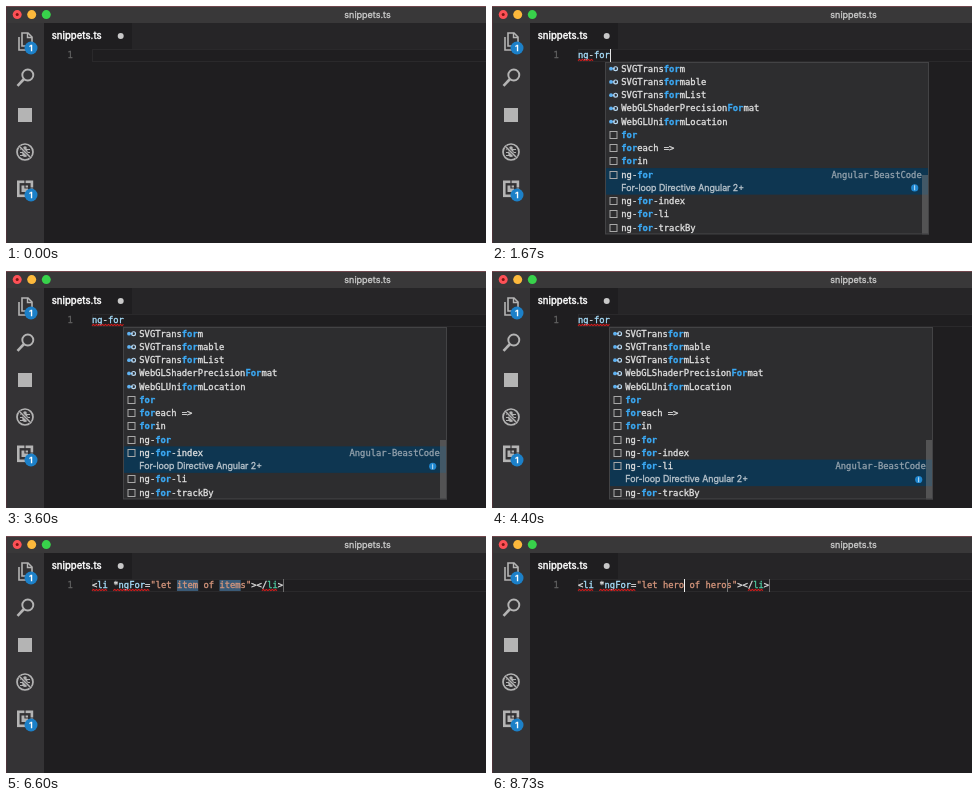
These frames come from a looping animation (480x237 px, 8.79 s). An HTML page with a canvas:

```html
<!DOCTYPE html>
<html lang="en">
<head>
<meta charset="utf-8">
<title>Snippet completion</title>
<style>
  html, body { margin: 0; width: 100%; height: 100%; overflow: hidden; background: #1f1e20; }
  canvas { display: block; }
</style>
</head>
<body>
<canvas id="stage" width="480" height="237"></canvas>
<script>
const c = document.getElementById('stage').getContext('2d');
const LOOP = 8790, LEFT = 86, CHAR = 5.31, ROW = 13.26, POPUP_TOP = 56, POPUP_WIDTH = 324;
const MONO = '8.82px "DejaVu Sans Mono", monospace';
const UI = 'Inter, sans-serif';
const BACK = '#1f1e20', BAR = '#343335', ICON = '#b4b4b4';
const PLAIN = '#e2e2e2', NAME = '#a8dffc', STRING = '#d6967c', TYPE = '#4ec9a0';

// Time and word of each key press
const typed = [[0, ''], [140, 'n'], [330, 'ng'], [670, 'ng-'], [1130, 'ng-f'], [1400, 'ng-fo'], [1640, 'ng-for']];
const renamed = [[4870, 'item'], [6870, 'h'], [7130, 'he'], [7400, 'her'], [7630, 'hero']];
const EXPAND = 4870, RENAME = 6870, CHECKED = 5870;

const ngList = ['ng-class', 'ng-for', 'ng-for-index', 'ng-for-li', 'ng-for-trackBy', 'ng-if',
  'ng-if-else', 'ng-model', 'ng-style', 'ng-submit', 'ng-switch'];
const forList = ['SVGTransform', 'SVGTransformable', 'SVGTransformList', 'WebGLShaderPrecisionFormat',
  'WebGLUniformLocation', 'for', 'foreach =>', 'forin', 'ng-for', 'ng-for-index', 'ng-for-li', 'ng-for-trackBy'];
const hList = ['ApplicationCache', 'Cache', 'CacheStorage', 'Headers', 'HashChangeEvent', 'MimeTypeArray',
  'SVGPathElement', 'SVGPathSeg', 'SharedWorker', 'WheelEvent'];

// from, to, left edge, query, list, selected row, scrollbar top
const popups = [
  [210, 400, 91, 'n', ngList, 0, 56],
  [400, 670, 97, 'ng', ngList, 0, 56],
  [1200, 1400, 107, 'f', forList, 8, 169],
  [1470, 1640, 113, 'fo', forList, 8, 169],
  [1640, 1930, 113, 'for', forList, 8, 169],
  [1930, 2770, 117, 'for', forList, 8, 169],
  [2770, 3930, 117, 'for', forList, 9, 169],
  [3930, EXPAND, 117, 'for', forList, 10, 169],
  [6930, 7400, 176, 'h', hList, 0, 56]
];

const colX = col => LEFT + col * CHAR;
const latest = (steps, t) => steps.filter(s => s[0] <= t).pop();

function box(x, y, w, h, color) {
  c.fillStyle = color;
  c.fillRect(x, y, w, h);
}
function dot(x, y, r, color) {
  c.fillStyle = color;
  c.beginPath();
  c.arc(x, y, r, 0, 7);
  c.fill();
}
function ring(x, y, r, color, width) {
  c.strokeStyle = color;
  c.lineWidth = width;
  c.beginPath();
  c.arc(x, y, r, 0, 7);
  c.stroke();
}
function line(color, width, ...pts) {
  c.strokeStyle = color;
  c.lineWidth = width;
  c.beginPath();
  for (let i = 0; i < pts.length; i += 2) c.lineTo(pts[i], pts[i + 1]);
  c.stroke();
}
function frame(x, y, w, h, color, width = 1) {
  c.strokeStyle = color;
  c.lineWidth = width;
  c.strokeRect(x, y, w, h);
}
// A hairline outline gives the glyphs a slightly heavier weight
function text(s, x, y, color, font = MONO, align = 'left') {
  c.font = font;
  c.fillStyle = c.strokeStyle = color;
  c.lineWidth = .3;
  c.textAlign = align;
  c.fillText(s, x, y);
  c.strokeText(s, x, y);
}
function code(parts) {
  let col = 0;
  for (const [s, color] of parts) {
    text(s, colX(col), 52, color);
    col += s.length;
  }
}
function squiggle(from, to) {
  const pts = [], end = colX(to);
  for (let x = colX(from), i = 0; x <= end; x += 1.5, i++) pts.push(x, 54.6 - i % 2 * 1.2);
  line('#d81c1c', 1.2, ...pts);
}
function caret(col, color) {
  box(Math.round(colX(col)), 43, 1, 13, color);
}

function badge(y) {
  dot(25, y, 6.5, '#1c80c8');
  text('1', 25, y + 3, '#fff', '600 8px ' + UI, 'center');
}
function activityBar() {
  box(1, 17, 37, 220, BAR);
  // files
  line(ICON, 1.6, 16, 40, 16, 27, 22, 27, 26, 31, 26, 40, 15.2, 40);
  line(ICON, 1.4, 21.5, 27, 21.5, 31.5, 26, 31.5);
  line(ICON, 1.6, 13, 31, 13, 44, 22, 44);
  badge(42);
  // search
  ring(21.8, 69, 5.5, ICON, 1.9);
  line(ICON, 2.6, 18, 73, 11.5, 79.8);
  // source control
  box(12, 102, 14, 14, ICON);
  // debug
  ring(19, 146, 8, ICON, 1.7);
  c.fillStyle = ICON;
  c.beginPath();
  c.ellipse(19, 147, 2.8, 4, 0, 0, 7);
  c.fill();
  for (const y of [143.5, 146.5, 149.5]) line(ICON, 1, 14, y, 24, y);
  dot(19, 142, 1.8, ICON);
  line(BAR, 2.6, 13.5, 140.5, 24.5, 151.5);
  line(ICON, 1.5, 13.2, 140.2, 24.8, 151.8);
  // extensions
  frame(12.3, 175.8, 13.6, 14, ICON, 2.6);
  box(15.5, 179.5, 6.5, 6.5, ICON);
  line(BAR, 1.2, 19, 174, 19, 182, 28, 182);
  badge(189);
}
function shell() {
  box(0, 0, 480, 237, BACK);
  box(0, 0, 480, 17, '#393839');
  box(0, 0, 480, 1, '#70464c');
  box(0, 1, 1, 236, '#4c3339');
  [['#fd5056', 11.2], ['#fdb93c', 25.7], ['#38d24b', 40.3]].forEach(([color, x]) => dot(x, 8.6, 4.5, color));
  dot(11.2, 8.6, 1.5, '#7a1512');
  text('snippets.ts', 361.5, 12, '#cacaca', '9px ' + UI, 'center');
  activityBar();
  box(38, 17, 442, 26, '#262527');
  box(38, 17, 88, 26, BACK);
  text('snippets.ts', 45.7, 33, '#fff', '500 9.5px ' + UI);
  dot(114.7, 30, 3, '#c8c8c8');
  frame(86.5, 43.5, 400, 12, '#2a292b');
  text('1', 61.5, 52, '#606060');
}

function itemIcon(x, y, isSnippet) {
  if (isSnippet) return frame(x + 5, Math.round(y) - 3.5, 7, 7, '#a8a8a8');
  line('#75beff', 1, x + 6, y, x + 10, y);
  dot(x + 6, y, 1.9, '#5fb2f2');
  ring(x + 10.6, y, 1.9, '#b9d9f2', 1.2);
}
function label(name, query, x, y) {
  const at = name.toLowerCase().indexOf(query), end = at + query.length;
  if (at < 0) return text(name, x, y, PLAIN);
  text(name.slice(0, at), x, y, PLAIN);
  text(name.slice(at, end), x + at * CHAR, y, '#3ba9f4', 'bold ' + MONO);
  text(name.slice(end), x + end * CHAR, y, PLAIN);
}
function popup([, , x, query, list, selected, barTop]) {
  const isSnippet = name => /^[a-z]/.test(name);
  const detail = isSnippet(list[selected]);
  const height = ROW * (list.length + detail);
  box(x, POPUP_TOP, POPUP_WIDTH, height, '#2d2d2f');
  let y = POPUP_TOP;
  list.forEach((name, i) => {
    const mid = y + ROW / 2, active = i === selected;
    if (active) box(x, y, POPUP_WIDTH, ROW * (1 + detail), '#0e3651');
    itemIcon(x, mid, isSnippet(name));
    label(name, query, x + 16.3, mid + 3);
    y += ROW;
    if (active && detail) {
      text('Angular-BeastCode', x + 316.7, mid + 3, '#93a1ac', MONO, 'right');
      text('For-loop Directive Angular 2+', x + 16.3, mid + ROW + 3, '#b9c4cc', '8.8px ' + UI);
      dot(x + 309.7, mid + ROW, 3.6, '#1f87d0');
      text('i', x + 309.7, mid + ROW + 2.4, '#d5ebfa', '6px ' + UI, 'center');
      y += ROW;
    }
  });
  box(x + 317, barTop, 7, Math.min(60, POPUP_TOP + height - barTop), 'rgba(130,130,130,.45)');
  frame(x + .5, POPUP_TOP + .5, POPUP_WIDTH - 1, height - 1, '#434345');
}

function typing(t, lit) {
  const word = latest(typed, t)[1];
  code([[word.slice(0, 2), NAME], [word.slice(2, 3), PLAIN], [word.slice(3), NAME]]);
  const wrong = t < 500 ? 0 : t < 1200 ? 2 : t < 2000 ? 3 : 6;
  if (wrong) squiggle(0, wrong);
  if (lit && word) caret(word.length, '#e4e4e4');
}
function expanded(t, lit) {
  const word = latest(renamed, t)[1], n = word.length;
  const first = 16, second = first + n + 4, close = second + n + 3;
  if (t < RENAME) {
    for (const col of [first, second]) box(colX(col), 44, 4 * CHAR, 11, '#3a5a76');
  }
  code([['<', PLAIN], ['li', NAME], [' *', PLAIN], ['ngFor', NAME], ['=', PLAIN],
    [`"let ${word} of ${word}s"`, STRING], ['></', PLAIN], ['li', TYPE], ['>', PLAIN]]);
  if (t >= CHECKED) {
    squiggle(0, 3);
    squiggle(4, 11);
    squiggle(close + 1, close + 4);
  }
  caret(close + 5, '#6c6c6c');
  if (lit) {
    caret(first + n, '#f0f0f0');
    if (t >= RENAME) caret(second + n, '#777');
  }
}

function draw(now) {
  const t = now % LOOP;
  const open = t >= EXPAND;
  const lastKey = latest(open ? renamed : typed, t)[0];
  const lit = (t - lastKey) % 1000 < 500;
  shell();
  (open ? expanded : typing)(t, lit);
  const list = popups.find(p => t >= p[0] && t < p[1]);
  if (list) popup(list);
}

const start = performance.now();
function tick() {
  draw(performance.now() - start);
  requestAnimationFrame(tick);
}
tick();
</script>
</body>
</html>
```
